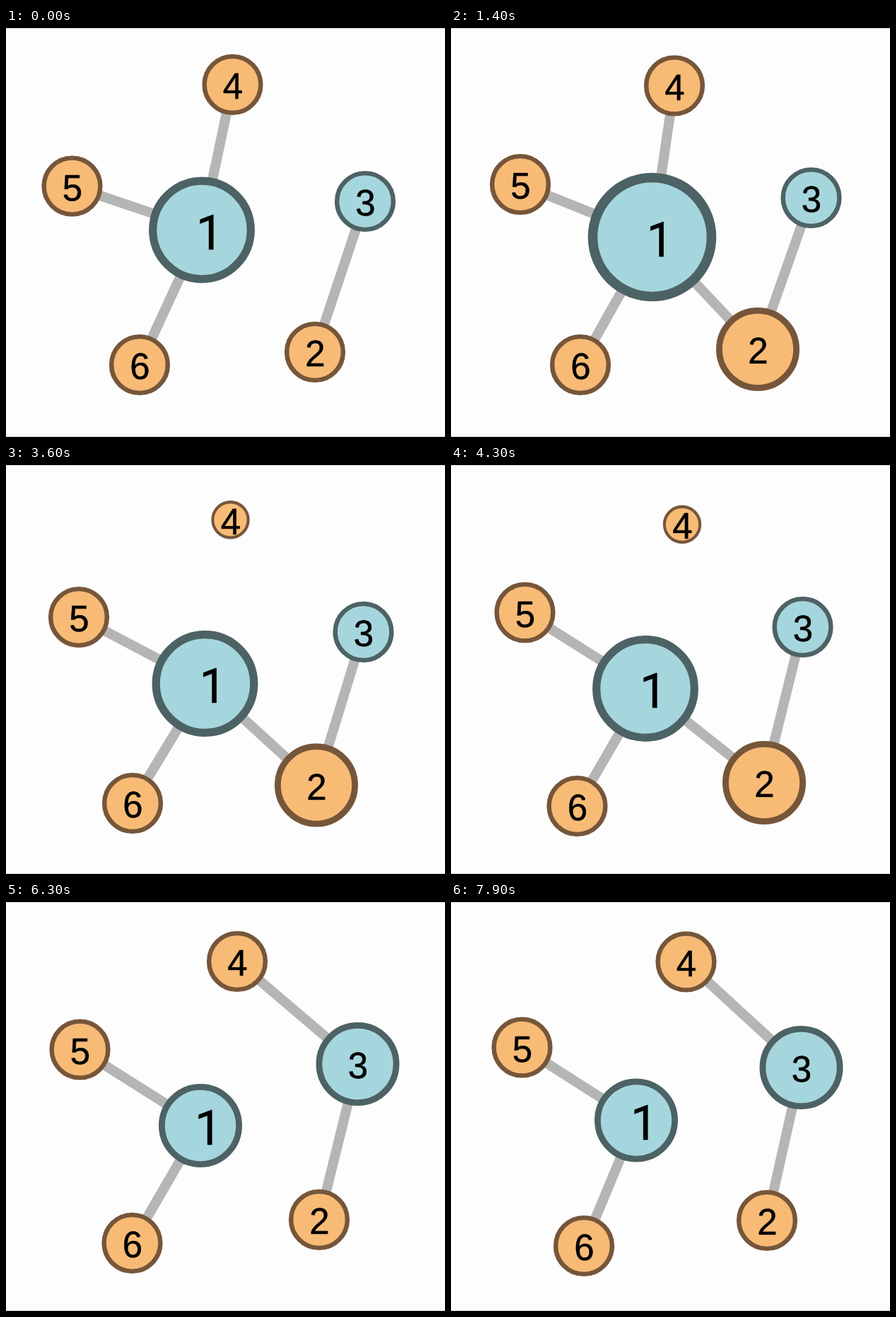
An HTML page for the animation above (8 s loop, 621 by 578 pixels).

```html
<!DOCTYPE html>
<html lang="en">
<head>
<meta charset="utf-8">
<title>Graph edge changes</title>
<style>
  html, body { margin: 0; width: 100%; height: 100%; overflow: hidden; background: #fdfdfd; }
  svg { display: block; width: 621px; height: 578px; }
  line { stroke: #b5b5b5; stroke-width: 14; }
  .cyan { fill: #a6d6dd; stroke: #4d6264; }
  .orange { fill: #f8bb76; stroke: #76563a; }
  text { font: 51px "Liberation Sans", Arial, sans-serif; fill: #000; stroke: #000; stroke-width: .5; text-anchor: middle; }
  text.hub { font: 68px Roboto, sans-serif; text-anchor: start; }
</style>
</head>
<body>
<svg viewBox="0 0 621 578">
  <rect width="621" height="1" fill="#cfcfcf"/>
  <rect y="577" width="621" height="1" fill="#cfcfcf"/>
  <g id="edges"></g>
  <g id="nodes"></g>
</svg>
<script>
const LOOP = 8000;

// Node centres 1 to 6, reached by a short move starting at `at`
const layouts = [
  { at: 0, span: 0, pos: [[277, 285.5], [437, 458], [508, 245], [320.5, 80], [93.5, 223.5], [189, 476]] },
  { at: 400, span: 300, pos: [[284.5, 295.5], [434, 454], [509.5, 240], [316, 81.5], [98, 221], [183, 476]] },
  { at: 2700, span: 250, pos: [[281.5, 309], [439, 452.5], [505.5, 236], [317.5, 77.5], [103, 215], [179, 478]] },
  { at: 3650, span: 300, pos: [[275, 316], [443, 449], [497.5, 229], [327, 84], [104.5, 208.5], [178.5, 482]] },
  { at: 6350, span: 300, pos: [[262, 308.5], [447, 450], [495.5, 234], [332.5, 84.5], [100.5, 205.5], [188, 486]] }
];

// Each edge exists from `from` until `to`
const edges = [
  { a: 1, b: 4, from: 0, to: 3300 },
  { a: 1, b: 5, from: 0, to: LOOP },
  { a: 1, b: 6, from: 0, to: LOOP },
  { a: 2, b: 3, from: 0, to: LOOP },
  { a: 1, b: 2, from: 1000, to: 6000 },
  { a: 3, b: 4, from: 4700, to: LOOP }
];

function add(parent, tag, attrs) {
  const el = document.createElementNS("http://www.w3.org/2000/svg", tag);
  set(el, attrs);
  return parent.appendChild(el);
}

function set(el, attrs) {
  for (const key in attrs) el.setAttribute(key, attrs[key]);
}

const edgeLayer = document.getElementById("edges");
const nodeLayer = document.getElementById("nodes");
for (const edge of edges) edge.el = add(edgeLayer, "line", {});

const nodes = [1, 2, 3, 4, 5, 6].map(id => {
  const group = add(nodeLayer, "g", {});
  const circle = add(group, "circle", { class: id === 1 || id === 3 ? "cyan" : "orange" });
  const label = add(group, "text", id === 1 ? { class: "hub", x: -8, y: 27 } : { x: 0.5, y: 20 });
  label.textContent = id;
  return { group, circle };
});

const ease = u => u * u * (3 - 2 * u);

function centres(t) {
  let current = layouts[0].pos;
  for (const { at, span, pos } of layouts.slice(1)) {
    if (t < at) break;
    const k = ease(Math.min(1, (t - at) / span));
    current = current.map(([x, y], i) => [x + (pos[i][0] - x) * k, y + (pos[i][1] - y) * k]);
  }
  return current;
}

function draw(t) {
  const pos = centres(t);
  const degree = [0, 0, 0, 0, 0, 0];
  for (const { a, b, from, to, el } of edges) {
    const shown = t >= from && t < to;
    el.style.display = shown ? "" : "none";
    if (!shown) continue;
    degree[a - 1]++;
    degree[b - 1]++;
    const [x1, y1] = pos[a - 1], [x2, y2] = pos[b - 1];
    set(el, { x1, y1, x2, y2 });
  }
  nodes.forEach(({ group, circle }, i) => {
    const radius = 27.2 + 15.9 * degree[i];
    const border = radius * 0.15;
    set(group, { transform: `translate(${pos[i]})` });
    set(circle, { r: radius - border / 2, "stroke-width": border });
  });
}

const start = performance.now();
function tick() {
  draw((performance.now() - start) % LOOP);
  requestAnimationFrame(tick);
}
tick();
</script>
</body>
</html>
```
